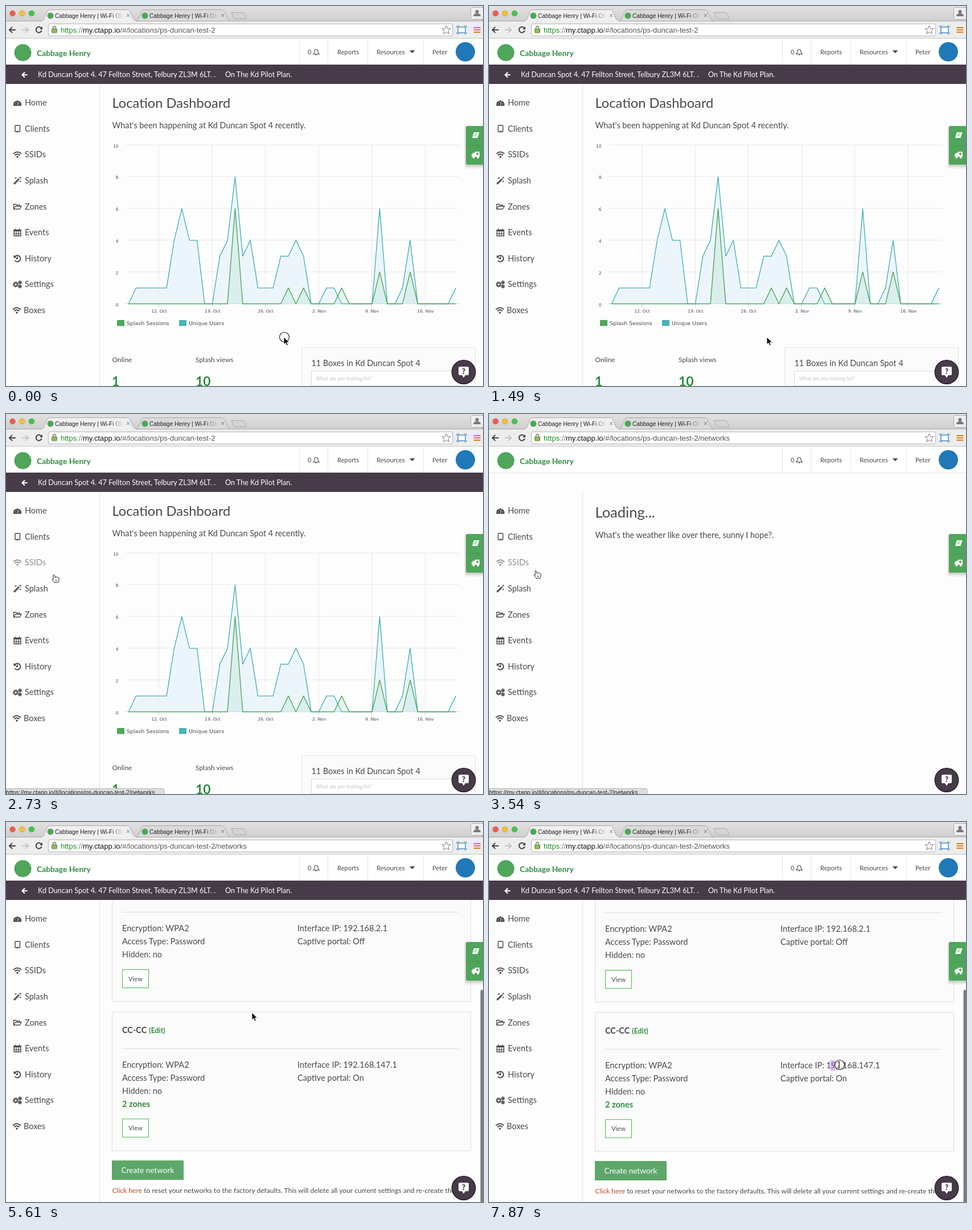
An HTML page for the animation above (8000 ms loop, 838x668 px).

```html
<!DOCTYPE html>
<html lang="en">
<head>
<meta charset="utf-8">
<title>Network settings</title>
<style>
html, body { margin: 0; width: 100%; height: 100%; overflow: hidden; background: #fdfdfd }
svg { display: block; width: 838px; height: 668px; font-family: Lato, sans-serif }
.ui { font-family: "Liberation Sans", Arial, sans-serif }
.chart { font-family: "DejaVu Sans", Verdana, sans-serif }
.line { fill: none; stroke: currentColor; stroke-width: 1.5 }
</style>
</head>
<body>
<script>
const INK = '#4a4a4a', GREEN = '#2f8c40', LEAF = '#4fa65b', PLUM = '#473a49';
const BRAND = 'Cabbage Henry', SITE = 'Kd Duncan Spot 4';
const BASE = 'https://my.ctapp.io/#/locations/ps-duncan-test-2';

const text = (x, y, size, str, more = '') =>
  `<text x="${x}" y="${y}" font-size="${size}" fill="${INK}" ${more}>${str}</text>`;
const rect = (x, y, w, h, fill, more = '') =>
  `<rect x="${x}" y="${y}" width="${w}" height="${h}" fill="${fill}" ${more}/>`;
const disc = (x, y, r, fill, more = '') => `<circle cx="${x}" cy="${y}" r="${r}" fill="${fill}" ${more}/>`;
const path = (d, more = '') => `<path d="${d}" ${more}/>`;
const group = (id, body, more = '') => `<g id="${id}" ${more}>${body}</g>`;
const at = (x, y, body) => `<g transform="translate(${x} ${y})">${body}</g>`;
const rule = (d, color = '#e4e4e4') => path(d, `fill="none" stroke="${color}"`);
const bold = 'font-weight="700"';
const middle = 'text-anchor="middle"';

// Browser window
function tab(x, fill) {
  return path(`M${x} 26.5C${x + 8} 26 ${x + 7} 6.5 ${x + 15} 6.5H${x + 151}C${x + 159} 6.5 ${x + 158} 26 ${x + 167} 26.5Z`,
      `fill="${fill}" stroke="#a9a9a9"`) +
    disc(x + 16, 17, 5.5, LEAF) +
    text(x + 24, 20.5, 10.2, BRAND + ' | Wi-Fi OM', 'class="ui" style="fill:#222"') +
    rect(x + 122, 9, 24, 15, `url(#fade${x})`) + rect(x + 145, 9, 4, 15, fill) +
    `<linearGradient id="fade${x}"><stop stop-color="${fill}" stop-opacity="0"/><stop offset=".9" stop-color="${fill}"/></linearGradient>` +
    rule(`M${x + 150} 14l5 5m0 -5l-5 5`, '#666');
}

function browser() {
  const lights = ['#ee5c54', '#f6bd3a', '#3fc84b']
    .map((c, i) => disc(11.5 + 16.7 * i, 13, 5, c, 'stroke="#0003" stroke-width=".7"')).join('');
  return rect(0, 0, 838, 27, 'url(#strip)') +
    '<linearGradient id="strip" x2="0" y2="1"><stop stop-color="#e2e2e2"/><stop offset="1" stop-color="#cecece"/></linearGradient>' +
    lights + rect(0, 26, 838, 31, '#ededed') + rule('M0 26.5H838', '#a9a9a9') +
    tab(228, '#dadada') + tab(62, '#efefef') + rule('M63 26.5H228', '#efefef') +
    path('M396 11.5h19q3 0 4 3l3 8h-19q-3 0-4-3z', 'fill="#d5d5d5" stroke="#aaa"') +
    rect(816.5, 2.5, 26, 21, '#eee', 'rx="3" stroke="#aaa"') +
    disc(827.5, 10, 3, '#777') + path('M821 18q0-5 6.5-5t6.5 5z', 'fill="#777"') +
    path('M17 42H6m5-5l-5 5l5 5', 'fill="none" stroke="#444" stroke-width="2"') +
    path('M28 42h11m-5-5l5 5l-5 5', 'fill="none" stroke="#c4c4c4" stroke-width="2"') +
    path('M62 39a5 5 0 1 0 .6 4', 'fill="none" stroke="#444" stroke-width="2"') + path('M64 36v5h-5z', 'fill="#444"') +
    rect(74.5, 31.5, 710, 21, '#fff', 'rx="2.5" stroke="#b5b5b5"') +
    rect(80.5, 40, 9, 7, '#8bbd5c', 'stroke="#58883a" rx="1"') +
    path('M82.5 40v-2a2.5 2.5 0 0 1 5 0v2', 'fill="none" stroke="#777" stroke-width="1.3"') +
    text(96, 46.5, 13, '<tspan fill="#1d8a25">https</tspan><tspan fill="#777">://</tspan><tspan fill="#111">my.ctapp.io</tspan>' +
      '<tspan id="url"></tspan>', 'class="ui" style="fill:#555"') +
    path('M773.5 34.5l2.2 5 5.3.5-4 3.6 1.2 5.3-4.7-2.8-4.7 2.8 1.2-5.3-4-3.6 5.3-.5z', 'fill="#fff" stroke="#777"') +
    rect(794, 37, 13, 10, '#fff', 'stroke="#4d8fcc" stroke-width="1.5"') +
    path('M792 38v-3h4M805 35h4v3M792 46v3h4M805 49h4v-3', 'fill="none" stroke="#4d8fcc"') +
    path('M821.5 38h12m-12 4h12m-12 4h12', 'stroke="#dd7c1c" stroke-width="2.2"') +
    rule('M0 57H838', '#b3b3b3');
}

// Site frame: header, side menu and floating buttons
function header() {
  return rect(0, 57.5, 838, 46, '#fff') + disc(29.5, 82, 15, LEAF) +
    text(54, 87.5, 13.8, BRAND, `${bold} style="fill:${GREEN}"`) +
    rule('M0 103.5H838M515.5 58v45M565.5 58v45M635.5 58v45M733.5 58v45') +
    text(530, 84.5, 11.2, '0') +
    path('M540 84.5q2-2 2-5a3 3 0 0 1 6 0q0 3 2 5zM543.5 86h3', `fill="none" stroke="${INK}" stroke-width="1.2"`) +
    text(582, 84.5, 11.2, 'Reports') + text(651, 84.5, 11.2, 'Resources') +
    path('M709 78h9.5l-4.75 5z', `fill="${INK}"`) + text(749, 84.5, 11.2, 'Peter') + disc(807, 80.5, 17, '#2078b8');
}

const wifi = '<path class="line" style="stroke-width:2" d="M-7-1.5q7-6.5 14 0M-4.5 1.2q4.5-4 9 0"/>' + disc(0, 4, 1.7, INK);
const cog = (x, y, r) => disc(x, y, r, 'none', `stroke="${INK}" stroke-width="2"`) +
  disc(x, y, r + 1.4, 'none', `stroke="${INK}" stroke-width="1.5" stroke-dasharray="1.5 1.4"`);
const menu = [
  ['Home', path('M-7 5.5a7.3 7.3 0 1 1 14 0z', `fill="${INK}"`) +
    path('M0 4l1.5-6M-5 2h1.5M3.5 2h1.5M-3-2l1 1', 'stroke="#fff" fill="none"')],
  ['Clients', rect(-4, -6, 8.5, 11.5, 'none', 'class="line" rx="1.5"') + path('M-1 4h2', 'class="line"')],
  ['SSIDs', wifi],
  ['Splash', path('M-6 6L3-3', 'class="line" style="stroke-width:2.8"') +
    path('M5-7v4M3-5h4M-3-6v3M-5-4.5h4M5 0v3M3.5 1.5h3', 'class="line" style="stroke-width:1"')],
  ['Zones', path('M-6.5 4.5v-8.5h4l1.5 1.5h5v2M-6.5 4.5l3-5h10.5l-3 5z', 'class="line" style="stroke-width:1.3"')],
  ['Events', rect(-6, -4.5, 12, 10.5, 'none', 'class="line"') + rect(-6, -5, 12, 3, INK) +
    path('M-3.5-7v4M3.5-7v4M-6 2h12M-2 -2v8M2-2v8', 'class="line" style="stroke-width:1.2"')],
  ['History', path('M-4.5-3a5.5 5.5 0 1 1 0 6.5M0-3v3.5h-2.5', 'class="line" style="stroke-width:2"') +
    path('M-6.5-6v5h5z', `fill="${INK}"`)],
  ['Settings', cog(-3, 0, 2.9) + cog(4.5, -3.5, 1.4) + cog(4.5, 3.5, 1.4)],
  ['Boxes', wifi],
];
const sideMenu = () => rule('M164.5 137V668') + menu.map(([name, icon], i) => {
  const y = 170 + 45.63 * i, left = name == 'Boxes' ? -1 : 0;
  return group(name, at(20 + left, y, icon) + text(33 + 2 * left, y + 5, 14.5, name), `color="${INK}"`);
}).join('');

const topBar = () => rect(0, 103, 838, 34, PLUM) +
  path('M37.5 121h-9m4.5-4.5l-4.5 4.5l4.5 4.5', 'fill="none" stroke="#fff" stroke-width="2.2"') +
  text(56, 125, 12.6, SITE + '. 47 Fellton Street, Telbury ZL3M 6LT. .', 'style="fill:#fff"') +
  text(385, 125, 12.6, 'On The Kd Pilot Plan.', 'style="fill:#fff"');

const floating = () => rect(805, 210, 36, 76, '#0000000d', 'rx="5"') + rect(806.5, 211, 34, 72, '#0000001a', 'rx="4"') +
  rect(808, 211, 34, 68, LEAF, 'rx="3"') + rule('M808 245.5h30', '#439250') +
  path('M822 222h9.5l-3 10h-9.5z', 'fill="#fff"') + path('M823 225h5m-6 3h5', `stroke="${LEAF}"`) +
  path('M818 265v-4l3-3h3v-2h8v9z', 'fill="#fff"') + disc(821.5, 266, 2, '#fff') + disc(829, 266, 2, '#fff') +
  path('M828 257.5v5m-2.5-2.5h5', `stroke="${LEAF}" stroke-width="1.5"`) +
  disc(804, 643.5, 20.8, PLUM, 'stroke="#1d171e" stroke-width="1.2"') +
  path('M797 634h14q2 0 2 2v11q0 2-2 2h-4l-3 4.5-3-4.5h-4q-2 0-2-2v-11q0-2 2-2z', 'fill="#fff"') +
  text(804, 646.5, 13, '?', `${middle} font-weight="900" style="fill:${PLUM}"`);

// Dashboard
const users = [...'01111146440034834111334300110000060014000001'].map(Number);
const peaks = { 14: 6, 21: 1, 23: 1, 28: 1, 33: 2, 37: 2 };
const dayX = i => 215.3 + 13.37 * i, valueY = v => 523.5 - 27.9 * v;

function series(values, stroke, fill) {
  const d = 'M' + values.map((v, i) => dayX(i).toFixed(1) + ' ' + valueY(v).toFixed(1)).join('L');
  return path(`${d}V523.5H215z`, `fill="${fill}"`) + path(d, `fill="none" stroke="${stroke}" stroke-width="1.4" stroke-linejoin="round"`);
}

function chart() {
  let s = '';
  for (let v = 0; v <= 10; v += 2) {
    const y = Math.round(valueY(v)) - .5;
    s += rule(`M210 ${y}H796`, v ? '#e8e8e8' : '#c5d0d8') + text(197.5, y + 4, 7.5, v, 'text-anchor="end"');
  }
  ['12. Oct', '19. Oct', '26. Oct', '2. Nov', '9. Nov', '16. Nov'].forEach((label, k) => {
    const x = Math.round(268 + 93.6 * k) + .5;
    s += rule(`M${x} 244V523`, '#e8e8e8') + rule(`M${x} 524v5`, '#c5d0d8') + text(x + .5, 538.5, 7.5, label, middle);
  });
  return s + series(users, '#48b3b5', '#e6f2fcb0') + series(users.map((_, i) => peaks[i] || 0), LEAF, '#a5dcc444') +
    rect(195, 552, 13, 10.5, LEAF) + text(212, 561, 9.4, 'Splash Sessions') +
    rect(304, 552, 13, 10.5, '#48b3b5') + text(321, 561, 9.4, 'Unique Users');
}

const dashboard = () => text(186.5, 179, 23.7, 'Location Dashboard') +
  text(186.5, 215, 14.4, `What's been happening at ${SITE} recently.`) +
  `<g class="chart">${chart()}</g>` +
  text(186.5, 626, 12, 'Online') + text(333, 626, 12, 'Splash views') +
  text(186, 668, 23, '1', `${bold} style="fill:${GREEN}"`) + text(333, 668, 23, '10', `${bold} style="fill:${GREEN}"`) +
  rect(519.5, 600.5, 305, 90, '#fbfbfb', 'stroke="#e4e4e4"') +
  text(536.5, 633, 14.4, '11 Boxes in ' + SITE) +
  rect(536.5, 641.5, 272, 26, '#fff', 'stroke="#d8d8d8"') + text(545, 658, 8.6, 'What are you looking for?', 'style="fill:#c4c4c4"');

const tooltip = () => path('M2 0H123q2 0 2 2V38q0 2-2 2H39l-5 5-5-5H2q-2 0-2-2V2q0-2 2-2z', `fill="#f9f9f9e6" stroke="${LEAF}" stroke-width="1.5"`) +
  '<text id="tipDate" x="6" y="16.5" font-size="10" fill="#333"></text>' + text(6, 29.5, 9.6, 'Splash Sessions: 0', bold);

// Network list
function card(y, name, ip, portal, zones) {
  const extra = zones ? 22.5 : 0;
  const row = (x, n, str, more) => text(x, y + 99 + 22.9 * n, 14.5, str, more);
  return rect(186.5, y + .5, 630, 222 + extra, '#fbfbfb', 'stroke="#dedede"') +
    text(204, y + 38, 14.5, `${name}<tspan dx="4" font-size="12.3" fill="${GREEN}">(Edit)</tspan>`, bold) +
    rule(`M204 ${y + 65.5}H795`, '#dcdcdc') +
    row(204, 0, 'Encryption: WPA2') + row(204, 1, 'Access Type: Password') + row(204, 2, 'Hidden: no') +
    row(512, 0, 'Interface IP: ' + ip) + row(512, 1, 'Captive portal: ' + portal) +
    (zones ? row(204, 3, zones, `${bold} style="fill:${GREEN}"`) : '') +
    rect(204.5, y + 166.5 + extra, 46, 32, '#fff', 'stroke="#4caf50"') + text(227.5, y + 186.5 + extra, 11.2, 'View', middle);
}
const networks = () => text(186.5, 182, 25.5, 'SSIDs.') + text(186.5, 218, 14.4, 'Read more about creating your first SSID or network.') +
  group('cards', card(239, 'private-1', '192.168.29.1', 'Off') + card(479, 'Hugh Aldor and Ned Braskin', '192.168.2.1', 'Off') +
    card(719, 'CC-CC', '192.168.147.1', 'On', '2 zones') +
    rect(186.5, 981.5, 125, 33, '#5ea76a', `stroke="${LEAF}"`) + text(249, 1003, 13.6, 'Create network', `${middle} style="fill:#fff"`) +
    text(186.5, 1038, 12.1, '<tspan fill="#b5482a">Click here</tspan> to reset your networks to the factory defaults. ' +
      'This will delete all your current settings and re-create the'));

const loading = () => text(186.5, 182, 25.5, 'Loading...') + text(186.5, 218, 14.4, "What's the weather like over there, sunny I hope?.");

const cursors = () =>
  group('ring', disc(1, 0, 8.5, '#ffffff80', 'stroke="#222" stroke-width="1.2"')) +
  group('arrow', path('M0 0v13l3-2.8 2 4.6 2.3-1-2-4.4h4.2z', 'fill="#111" stroke="#fff" stroke-width=".8"')) +
  group('hand', path('M-3-6q1.5-1.5 2.5.5l1 4 1-1.5q1.5-.5 2 .8 1.5-.8 2 .8 1.7-.3 1.7 1.4 0 4-1.7 7h-6.5q-1.5-3-4-5 0-2 2.3-.8z', 'fill="#fff" stroke="#222"') +
    path('M1 2v3m2-3v3', 'stroke="#222" stroke-width=".7"')) +
  group('beam', path('M-2-6q2 0 2 1.5v9q0 1.5-2 1.5M2-6q-2 0-2 1.5M0 4.5q0 1.5 2 1.5M-1.5 2h3', 'fill="none" stroke="#222"'));

document.body.innerHTML = `<svg viewBox="0 0 838 668">` + rect(0, 0, 838, 668, '#fdfdfd') +
  '<clipPath id="view"><rect y="137" width="838" height="531"/></clipPath>' +
  group('dash', dashboard()) + group('load', loading()) +
  `<g clip-path="url(#view)">` + group('nets', networks()) + '</g>' +
  group('mark', rect(599.5, 419, 8.5, 18, '#b56cf0', 'opacity=".5"')) +
  browser() + header() + sideMenu() + group('bar', topBar()) + group('tip', tooltip(), 'class="chart"') + floating() +
  group('scrollbar', rect(833.5, 295, 7, 380, '#7d7d7d', 'rx="3"')) +
  group('status', path('M-1 670V658.5H275q3 0 3 3V670z', 'fill="#dedede" stroke="#b0b0b0"') +
    '<text id="link" class="ui" x="0" y="669" font-size="10.4" fill="#222"></text>') +
  group('cursor', cursors()) + rect(0, 0, 838, 668, '#fefefe', 'id="white"') + '</svg>';

const el = id => document.getElementById(id);
const show = (id, on) => el(id).setAttribute('display', on ? 'inline' : 'none');
const move = (id, x, y) => el(id).setAttribute('transform', `translate(${x} ${y})`);

// Keys are [time, ...values]; values run linearly between them
function track(keys, t) {
  const n = keys.findIndex(k => k[0] > t);
  if (n < 1) return keys[n ? keys.length - 1 : 0].slice(1);
  const a = keys[n - 1], b = keys[n], f = (t - a[0]) / (b[0] - a[0]);
  return a.slice(1).map((v, i) => v + (b[i + 1] - v) * f);
}
const pointer = [[0, 488, 582], [1600, 488, 582], [2090, 167, 351], [2140, 160, 348], [2380, 95, 316], [2470, 92, 310], [2820, 84, 282],
  [4400, 84, 282], [4930, 432, 335], [6130, 432, 335], [6620, 582, 414], [6940, 596, 424], [7650, 596, 424], [7870, 615, 427]];
const fade = [[0, 0], [930, 0], [1110, 1], [1160, 1], [1490, 0]];

function draw(now) {
  const t = now % 8000, within = (a, b) => t >= a && t < b;
  const [x, y] = track(pointer, t);
  const scroll = t < 5290 ? 0 : t < 5400 ? 110 : t < 5610 ? 300 : t < 7690 ? 386 : 385;

  show('dash', t < 3460);
  show('load', within(3460, 3720));
  show('nets', t >= 3720);
  show('cards', t >= 3920);
  show('bar', !within(3460, 3720));
  move('nets', 0, -scroll);
  el('url').textContent = BASE.slice(19) + (t < 3380 ? '' : '/networks');

  show('tip', within(1780, 2640));
  const day = Math.max(0, Math.min(12, Math.round((x - 215) / 13.37)));
  move('tip', Math.max(190, dayX(day) - 34), 468);
  el('tipDate').textContent = new Date(Date.UTC(2015, 9, 8 + day))
    .toLocaleDateString('en-US', { weekday: 'long', month: 'short', day: 'numeric', year: 'numeric', timeZone: 'UTC' });

  show('status', within(2300, 4480));
  el('link').textContent = BASE + (t < 2560 ? '/splash' : '/networks');
  el('Splash').setAttribute('opacity', within(2300, 2560) ? .6 : 1);
  el('SSIDs').setAttribute('opacity', within(2560, 4430) ? .6 : 1);

  show('scrollbar', within(5290, 6250) || t >= 7690);
  show('mark', t >= 7770);

  move('cursor', x, y);
  const hand = within(2300, 4280), beam = t >= 6860;
  show('hand', hand);
  show('beam', beam);
  show('arrow', !hand && !beam);
  show('ring', t < 60 || within(3300, 3380) || t >= 7450);
  el('white').setAttribute('opacity', track(fade, t)[0]);
  requestAnimationFrame(draw);
}
requestAnimationFrame(draw);
</script>
</body>
</html>
```
